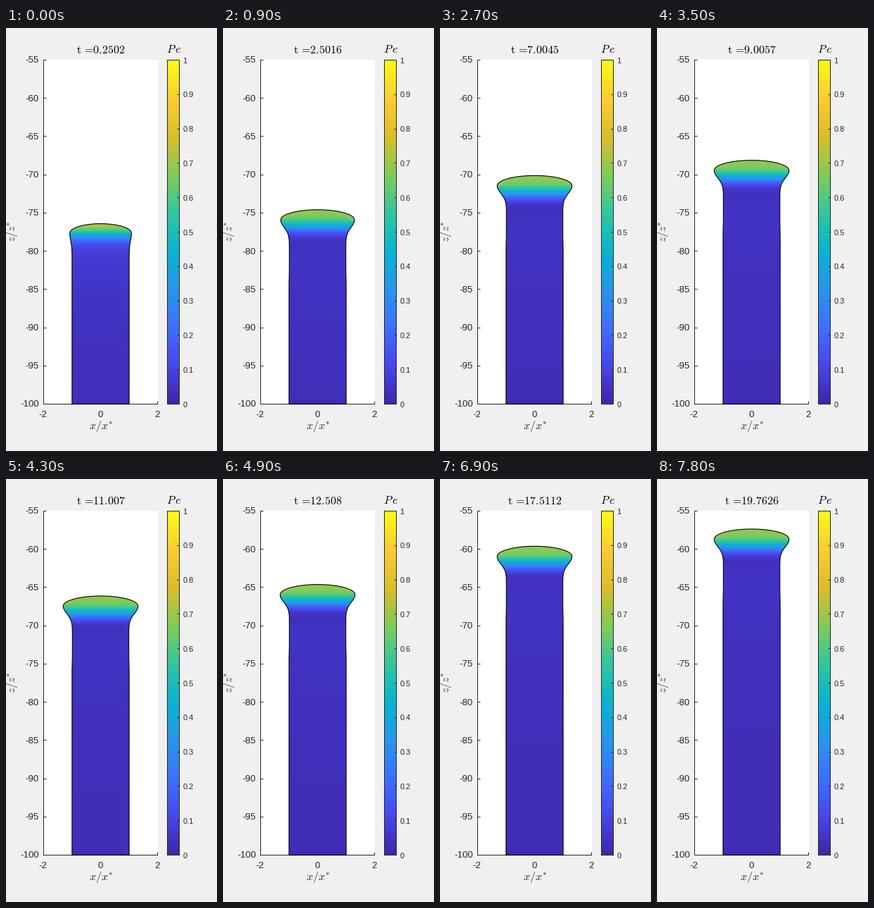
A matplotlib script for the animation above (7.9 s loop, 300 by 600 pixels).

```python
import numpy as np
import matplotlib.pyplot as plt
from matplotlib.animation import FuncAnimation
from matplotlib.colors import LinearSegmentedColormap
from matplotlib.patches import Polygon, Rectangle

FRAMES, STEP = 79, 0.2501595
INK = (0.15, 0.15, 0.15)
LEFT, RIGHT, TOP, BOTTOM = 53.5, 215.5, 45.5, 533.5
MID = (LEFT + RIGHT) / 2
UNIT_Z = (BOTTOM - TOP) / 45
STEM = 40.6

parula = LinearSegmentedColormap.from_list("parula", [
    (.242, .150, .660), (.280, .278, .922), (.244, .436, .999),
    (.154, .590, .922), (.030, .708, .816), (.194, .776, .625),
    (.504, .799, .348), (.863, .741, .160), (.989, .800, .195),
    (.977, .984, .081)])

plt.rcParams["mathtext.fontset"] = "cm"
plt.rcParams["font.family"] = "Liberation Sans"

fig = plt.figure(figsize=(3, 6), dpi=100, facecolor=(240 / 255,) * 3)
ax = fig.add_axes([0, 0, 1, 1])
ax.axis("off")


def px(n):
    return n * 0.72


def label(x, y, text, size, ha="center", color=INK, **kw):
    return ax.text(x, y, text, fontsize=px(size), ha=ha, va="baseline",
                   color=color, **kw)


def line(xs, ys, z=2):
    ax.plot(xs, ys, color=INK, lw=px(1), zorder=z, snap=False,
            solid_capstyle="butt", solid_joinstyle="miter")


def tick(x0, x1, y, z=2):
    line([x0, x1], [round(y - .5) + .5] * 2, z)


# Main axes
ax.add_patch(Rectangle((53, 45), 163, 489, color="white", lw=0, zorder=0))
line([LEFT, LEFT], [45, 534])
line([53, 216], [BOTTOM, BOTTOM])
for z in range(-100, -54, 5):
    y = TOP + (-55 - z) * UNIT_Z
    tick(53, 57.5, y)
    label(47, y + 3.9, str(z), 13.3, "right")
for x, name in ((LEFT - 0.8, "-2"), (MID, "0"), (RIGHT, "2")):
    label(x, 552, name, 13.3)
line([RIGHT, RIGHT], [529.5, 534])
label(135.5, 569, r"$x/x^{\ast}$", 16)
label(13, 289, r"$z/z^{\ast}$", 16, rotation=90, rotation_mode="anchor")
title = label(135, 36, "", 16, color="black")

# Colour bar
ax.imshow(np.linspace(1, 0, 489)[:, None], extent=(229, 247, 534, 45),
          cmap=parula, vmin=0, vmax=1, aspect="auto", zorder=1)
line([229.5, 246.5, 246.5, 229.5, 229.5],
     [TOP, TOP, BOTTOM, BOTTOM, TOP], 3)
for k in range(11):
    y = BOTTOM - k * (BOTTOM - TOP) / 10
    tick(243.5, 247, y, 3)
    label(251.6, y + 4.2, f"{k / 10:g}", 11, "left")
label(238.5, 35, r"$P\hspace{0.16}e$", 16, color="black")

# Growing column
gx, gy = np.meshgrid(np.arange(74.5, 195), np.arange(45.5, 534))
field = ax.imshow(np.zeros(gx.shape), extent=(74, 195, 534, 45), cmap=parula,
                  vmin=0, vmax=1, aspect="auto", zorder=4)
outline = Polygon([(0, 0), (1, 0), (1, 1)], closed=True, fill=False,
                  ec="black", lw=px(1.1), zorder=5, joinstyle="round",
                  snap=False)
ax.add_patch(outline)
ax.set_xlim(0, 300)
ax.set_ylim(600, 0)


def shape(i):
    """Tip height, cap half-width, cap depth and youth (1 fading to 0)."""
    young = np.exp(-i / 3.5)
    z = (i + 1) * STEP - 77.11 + 0.46 * young
    return TOP + (-55 - z) * UNIT_Z, 53.2 - 9.4 * young, 14.5 - young, young


def contour(tip, wide, deep, young):
    a = np.linspace(0, np.pi / 2, 50)
    d = np.linspace(deep, BOTTOM - tip, 300)
    # The stem is slightly pinched until well below the neck
    stem = STEM - 0.45 * (1 - young) / (1 + np.exp((d - 95) / 4))
    stem += (wide - stem) * np.exp(-((d - deep) / 14.8) ** 2)
    xs = np.concatenate([wide * np.sin(a), stem])
    ys = tip + np.concatenate([deep * (1 - np.cos(a)), d])
    return np.column_stack([np.concatenate([MID - xs[::-1], MID + xs]),
                            np.concatenate([ys[::-1], ys])])


def values(tip, wide, deep, young):
    d = np.clip(gy - tip, 0, None)
    x = np.abs(gx - MID)
    start = .62 * np.exp(-(d / 19) ** 2) + .03 + .08 * np.exp(-d / 80)
    stem = (.025 + .04 * np.exp(-d / 150)) * (1 - np.exp(-(d / 50) ** 4))
    grown = .68 * np.exp(-(d / 28.8) ** 3) + stem
    v = young * start + (1 - young) * grown

    # Warm rim at the shoulders, darker foot
    edge = np.clip(1 - (x / wide) ** 2 - (d / deep - 1) ** 2, 0, None)
    v += (d < deep) * (.13 - .06 * young) * np.exp(
        -edge / .12 - ((x - .83 * wide) / 6) ** 2)
    return v - .015 * np.clip((gy - 526) / 6, 0, 1)


def draw(i):
    s = shape(i)
    outline.set_xy(contour(*s))
    field.set_data(values(*s))
    field.set_clip_path(outline)
    t = f"{(i + 1) * STEP:.4f}".rstrip("0").rstrip(".")
    title.set_text(rf"$\mathrm{{t}}\hspace{{0.18}}=\hspace{{-0.2}}{t}$")
    return field, outline, title


anim = FuncAnimation(fig, draw, frames=FRAMES, interval=100, repeat=True,
                     repeat_delay=0, init_func=lambda: draw(0))
plt.show()
```
